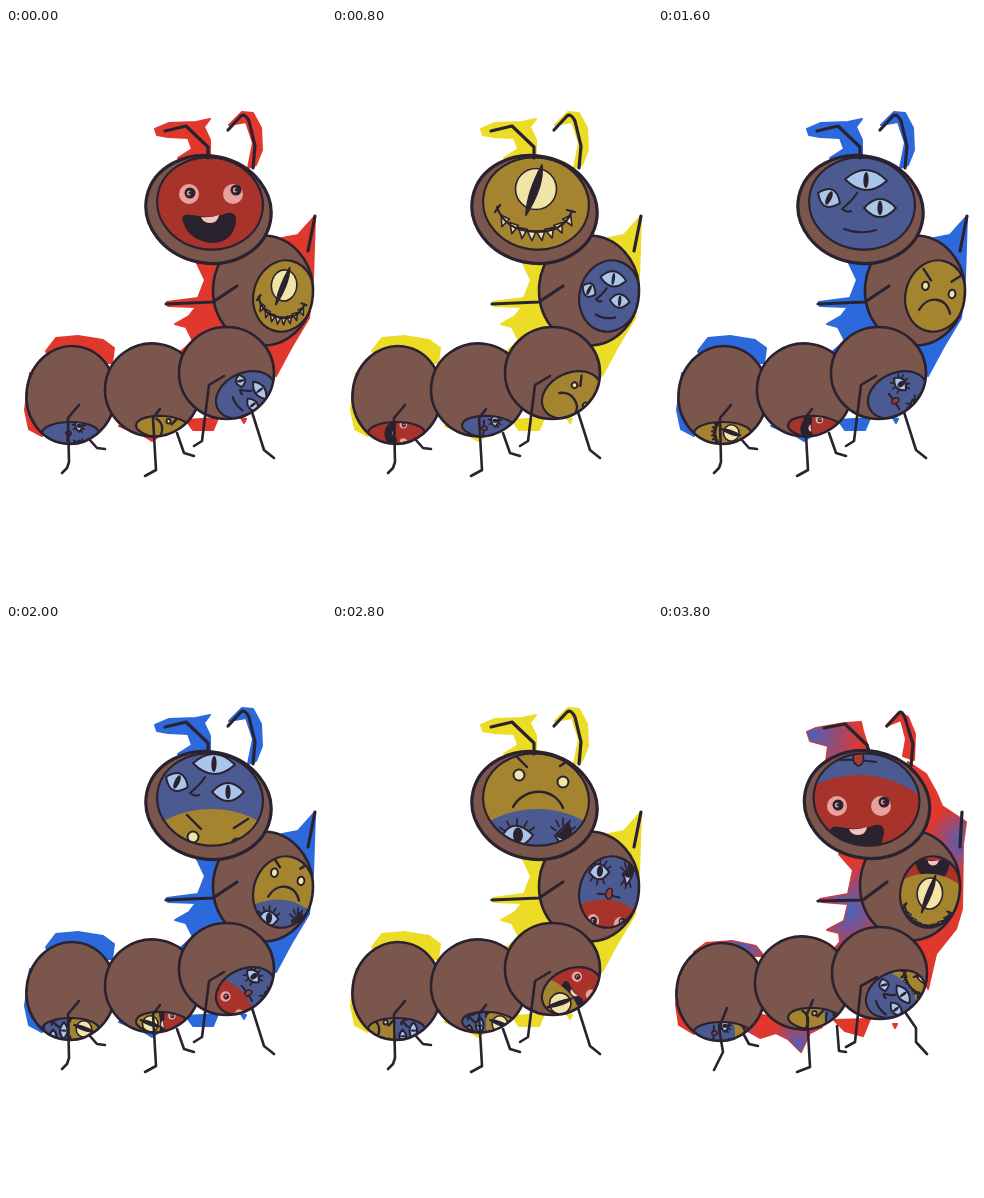
Write an HTML page that moves like this. It is 320 by 568 pixels and loops after 4000 ms.

```html
<!DOCTYPE html>
<html lang="en">
<head>
<meta charset="utf-8">
<title>Caterpillar</title>
<style>
  html, body { margin: 0; width: 100%; height: 100%; overflow: hidden; background: #fff; }
  svg { display: block; width: 100vw; height: 100vh; }
  .ink { fill: none; stroke: #2b2230; stroke-linecap: round; stroke-linejoin: round; }
  .face * { vector-effect: non-scaling-stroke; }
</style>
</head>
<body>
<svg id="stage" viewBox="0 0 320 568"></svg>
<script>
const INK = '#2b2230', BROWN = '#7b564d';
const SKIN = { red: '#a8332a', yellow: '#a5842f', blue: '#4b5b92' };
const GLOW = { red: '#e1382d', yellow: '#eddc26', blue: '#2b69dc' };
const CREAM = '#f0e4a6', ICE = '#a9c6ea', PINK = '#e8a19c';
const STEP = 200, FRAMES = 20, STEPS_PER_FACE = 4;

const line = (d, w = 2.2) => `<path class="ink" d="${d}" stroke-width="${w}"/>`;
const shape = (d, fill, w = 1.8) =>
  `<path d="${d}" fill="${fill}" stroke="${INK}" stroke-width="${w}" stroke-linejoin="round"/>`;
const oval = (x, y, rx, ry, fill, w = 0, rot = 0) =>
  `<ellipse cx="${x}" cy="${y}" rx="${rx}" ry="${ry}" fill="${fill}" stroke="${INK}" stroke-width="${w}" transform="rotate(${rot} ${x} ${y})"/>`;
const at = (x, y, rot, body) => `<g transform="translate(${x} ${y}) rotate(${rot})">${body}</g>`;

function roundEye(x, y, px, py) {
  return oval(x, y, 10, 10, PINK) + oval(x + px, y + py, 5.5, 5.5, INK) +
    oval(x + px - 1, y + py, 2.2, 2.6, PINK) + oval(x + px, y + py, 1.4, 1.4, INK);
}

function slitEye(x, y, w, h, rot) {
  return at(x, y, rot, shape(`M${-w} 0Q0 ${-2 * h} ${w} 0Q0 ${2 * h} ${-w} 0Z`, ICE, 2) +
    oval(0, 0, 2.6, h * 0.8, INK));
}

function teeth() {
  let out = '';
  for (let i = 0; i < 8; i++) {
    const u = -1 + (i + 0.5) / 4, x = u * 35, y = 28 - 18 * u * u;
    out += at(x, y, -30 * u, shape('M-4.5 0L1 10L4.5 0Z', CREAM, 1.6));
  }
  return out;
}

function lashes(w, h) {
  let d = '';
  for (const a of [-150, -120, -90, -60, -30, 60, 95, 130]) {
    const c = Math.cos(a * Math.PI / 180), s = Math.sin(a * Math.PI / 180);
    d += `M${c * w} ${s * h}L${c * (w + 6)} ${s * (h + 7)}`;
  }
  return line(d, 1.7);
}

const faces = [
  { color: 'red', art:
    roundEye(-21, -9, 1, -1) + roundEye(23, -9, 3, -4) +
    shape('M-27 15Q-25 11 -18 13Q2 17 17 11Q26 9 25 19Q22 39 1 39Q-23 36 -27 15Z', INK) +
    '<path d="M-9 14Q1 15 9 12Q8 19 1 20Q-7 20 -9 14Z" fill="#f2c4bd"/>' },
  { color: 'yellow', art:
    oval(0, -14, 20.5, 20.5, CREAM, 1.6) + shape('M6 -38Q8 -17 -10 12Q-9 -10 6 -38Z', INK) +
    teeth() + line('M-39 4Q-31 28 0 29Q28 29 36 8M-41 9L-36 2M31 7L39 9') },
  { color: 'blue', art:
    slitEye(4, -23, 21, 10, 2) + slitEye(-33, -5, 12, 9, 25) + slitEye(18, 5, 16, 9, 0) +
    line('M-5 -10Q-9 -3 -20 6Q-15 10 -11 8M-18 26Q-2 32 14 27') },
  { color: 'yellow', art:
    oval(-17, -12, 5.5, 5.5, CREAM, 2) + oval(27, -5, 5.5, 5.5, CREAM, 2) +
    line('M-23 -34L-9 -20M24 -21L38 -30M-23 20C-12 0 18 -1 27 21', 2.4) },
  { color: 'blue', art:
    at(-19, -13, 0, lashes(14, 10) + shape('M-16 2Q-5 -21 16 -1Q3 19 -16 2Z', ICE, 2) + oval(1, -1, 5, 7.5, INK)) +
    at(27, -13, 0, lashes(8, 11) + shape('M-8 0Q0 -9 5 -13Q13 -1 -1 14Q-3 5 -8 0Z', ICE, 2) +
      '<path d="M-7 0Q2 -9 5 -13Q10 -4 7 2Q1 6 -7 0Z" fill="#2b2230"/>') +
    line('M-18 16Q-4 15 18 18', 2) + shape('M-4 11Q0 4 5 9Q7 21 0 22Q-7 18 -4 11Z', '#a43a31', 1.6) }
];

// Back to front. Ovals are [x, y, rx, ry, rotation]; view is [x, y, rotation, scaleX, scaleY].
// Each part also has a nudge [x, y] for the second pose.
const segments = [
  { lag: 4, body: [65, 367, 44.5, 49, 8], hole: [64.5, 405, 28.5, 11, 0], view: [68, 405, 90, .4, .38],
    nudge: { body: [-2, 1], hole: [-1, 4], view: [0, 4] } },
  { lag: 3, body: [146.5, 362, 47.5, 46.5, 10], hole: [157, 399, 27, 11, 4], view: [158, 400, 90, .4, .38],
    nudge: { body: [-2, -3], hole: [0, -4], view: [0, -4] } },
  { lag: 1, body: [257, 262.5, 50, 55, 0], hole: [277.5, 268, 30, 36, 14], view: [277, 268, 6, .62, .76],
    nudge: { body: [-5, -1], hole: [-5, 0], view: [-5, 0] } },
  { lag: 2, body: [220.5, 345, 47.5, 46, 0], hole: [239.5, 367, 31, 22, -25], view: [243, 368, 52, .52, .52],
    nudge: { body: [1, 4], hole: [-2, 3], view: [-2, 3] } },
  { lag: 0, body: [202.5, 181.5, 63, 53.5, 12], hole: [204, 175.5, 53, 46, 8], view: [204, 175, 0, 1, 1],
    nudge: { body: [6.5, -1], hole: [4.5, 0], view: [-4, 0] } }
];

const poses = [
  { glow: [
      'M149 101L163 95L190 94L204 91L198 99L204 112L204 130H172L186 121L182 110L162 109L151 107Z',
      'M223 97L236 84L247 85L255 100L256 122L250 137L242 140L247 115L240 94Z',
      'M309 188L307 250L303 290L285 320L270 348L252 310L266 212L292 207Z',
      'M190 233H225L215 310L175 332L173 325L187 313L180 299L169 296L183 288L190 279L162 278L161 274L192 270L199 252Z',
      'M40 323L50 310L72 308L97 312L108 320L106 335H45ZM24 345L19 382L23 401L36 408Z',
      'M113 398L126 403L135 399ZM138 408L146 413L155 407ZM180 392L187 402L207 402L212 390ZM235 390L238 395L240 391Z'
    ],
    limbs: ['M159 103L180 98L202 119V130', 'M222 102L235 88Q239 85 243 93L249 118L247 140',
      'M231 258L207 274L160 276', 'M218 348L203 357L196 413L188 418', 'M246 384L258 422L268 430',
      'M154 381L147 390L150 442L139 448', 'M171 405L178 425L188 428',
      'M73 377L62 390L63 434L61 440L56 445', 'M83 411L91 420L99 421'],
    spike: 'M309 188L302 223' },
  { glow: [
      'M149 108L158 104L187 99L203 98L205 107L211 126L180 140L150 190L149 168L168 138L170 122L152 117Z',
      'M228 102L241 88L250 93L257 110L256 136L245 132L248 115L243 96Z',
      'M250 138L268 150L278 168L284 182L308 198L305 220L304 285L298 305L278 330L270 365L250 312Z',
      'M181 230H225L215 320L168 335L182 318L181 309L169 306L186 297L190 280L164 278L162 275L190 270L195 246Z',
      'M36 328L48 319L74 317L98 322L106 332H40ZM25 345L18 380L21 401L36 410Z',
      'M86 405L104 391L140 397L164 403L152 409L143 428L130 415L118 409L102 414ZM176 396L187 407L205 412L212 395ZM235 400L237 404L239 400Z'
    ],
    limbs: ['M166 104L187 100L209 121L211 128', 'M229 102L241 89Q244 86 247 94L255 120L253 142',
      'M229 258L205 276L160 277', 'M219 353L203 362L197 418L188 423', 'M247 388L258 404V418L269 430',
      'M155 376L149 390L152 443L139 448', 'M179 402L181 427L188 428',
      'M69 384L61 404L65 428L56 446', 'M86 411L91 420L100 422'],
    spike: 'M304 188L302 223' }
];

// How far the leaving face has risen and how far below rest the next one is.
const rise = [0, -4, -12, -55], below = [0, 82, 50, 16];
const tintSpots = [[150, 112, 55], [190, 287, 50], [85, 318, 35], [140, 424, 32], [306, 218, 38], [75, 410, 25]];

function drawGlow(pose, from, to, mixed) {
  const d = pose.glow.join('');
  const fill = mixed ? to : from;
  let out = `<path d="${d}" fill="${fill}" stroke="${fill}" stroke-width="2" stroke-linejoin="round"/>`;
  if (mixed) {
    out += `<defs><radialGradient id="tint"><stop stop-color="${from}" stop-opacity=".85"/>` +
      `<stop offset="1" stop-color="${from}" stop-opacity="0"/></radialGradient>` +
      `<clipPath id="halo"><path d="${d}"/></clipPath></defs><g clip-path="url(#halo)">` +
      tintSpots.map(([x, y, r]) => `<circle cx="${x}" cy="${y}" r="${r}" fill="url(#tint)"/>`).join('') + '</g>';
  }
  return out;
}

function drawSegment(seg, turn, phase, second) {
  const place = key => {
    const [x, y, ...rest] = seg[key], [dx, dy] = second ? seg.nudge[key] : [0, 0];
    return [x + dx, y + dy, ...rest];
  };
  const ring = ([x, y, rx, ry, rot], fill, w) => oval(x, y, rx, ry, fill, w, rot);
  const body = place('body'), hole = place('hole'), [x, y, rot, sx, sy] = place('view');
  const face = faces[(turn + seg.lag) % 5], next = faces[(turn + seg.lag + 1) % 5];
  let art = `<rect x="-200" y="-200" width="400" height="400" fill="${SKIN[face.color]}"/>` +
    at(0, rise[phase], 0, face.art);
  if (phase) {
    art += at(0, below[phase], 0, oval(0, 70, 105, 110, SKIN[next.color], 0, 6) + next.art);
  }
  const id = seg.lag;
  return `<defs><clipPath id="b${id}">${ring(body)}</clipPath><clipPath id="h${id}">${ring(hole)}</clipPath></defs>` +
    ring(body, BROWN, 0) +
    `<g clip-path="url(#b${id})"><g clip-path="url(#h${id})"><g class="face" transform="translate(${x} ${y}) rotate(${rot}) scale(${sx} ${sy})">${art}</g></g>` +
    ring(hole, 'none', 2.2) + '</g>' + ring(body, 'none', id ? 2.6 : 3.2);
}

function draw(index) {
  const turn = Math.floor(index / STEPS_PER_FACE), phase = index % STEPS_PER_FACE;
  const second = index % 2 === 1, pose = poses[+second];
  const from = GLOW[faces[turn].color], to = GLOW[faces[(turn + 1) % 5].color];
  return drawGlow(pose, from, to, phase === 3) + line(pose.spike, 3.2) +
    segments.map(seg => drawSegment(seg, turn, phase, second)).join('') +
    pose.limbs.map((d, i) => line(d, i < 3 ? 3.2 : 2.6)).join('');
}

const stage = document.getElementById('stage');
const start = performance.now();
let shown = -1;

function tick(now) {
  const index = Math.floor(Math.max(0, now - start) / STEP) % FRAMES;
  if (index !== shown) stage.innerHTML = draw(shown = index);
  requestAnimationFrame(tick);
}
tick(start);
</script>
</body>
</html>
```
